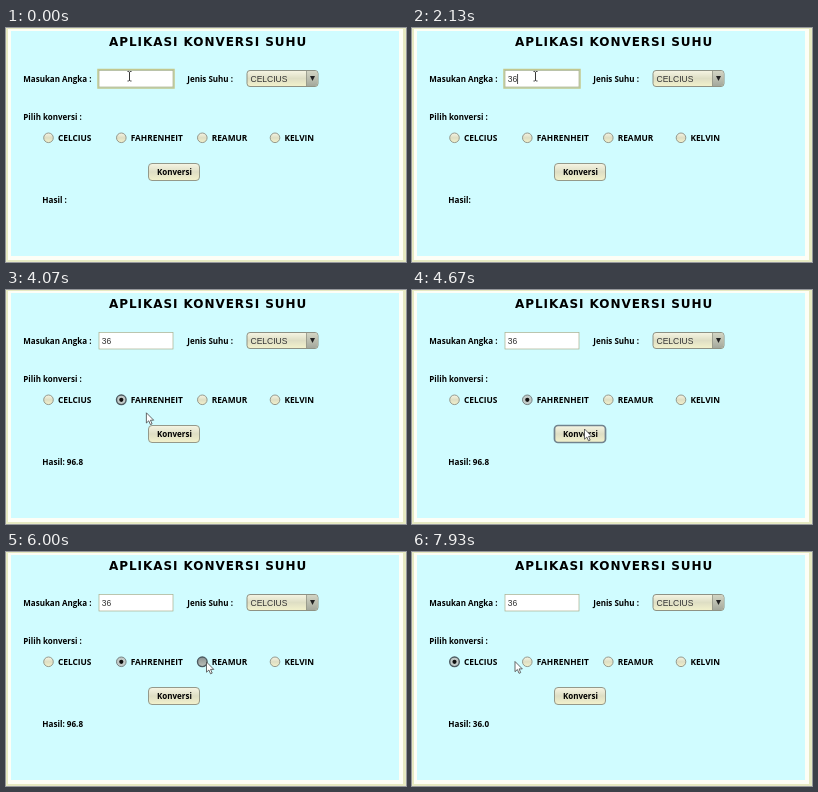
An HTML page for the animation above (8000 ms loop, 400 by 234 pixels).

```html
<!DOCTYPE html>
<html lang="id">
<head>
<meta charset="utf-8">
<title>Aplikasi Konversi Suhu</title>
<style>
  html, body { margin: 0; width: 100%; height: 100%; overflow: hidden; background: #e6e9c2; }
  svg { display: block; width: 100vw; height: 100vh; }
  text { fill: #000; }
  .label { font: bold 8px "Open Sans", "Noto Sans", sans-serif; }
  .option { font-size: 8.35px; }
  .result { font-size: 8.15px; }
  .field { font: 8.5px "Liberation Sans", Arial, sans-serif; fill: #333; }
  .title { font: bold 12px "DejaVu Sans", Verdana, sans-serif; letter-spacing: .95px; }
</style>
</head>
<body>
<svg viewBox="0 0 400 234">
  <defs>
    <linearGradient id="face" x2="0" y2="1">
      <stop offset="0" stop-color="#f6f5e4"/>
      <stop offset=".5" stop-color="#dedec4"/>
      <stop offset="1" stop-color="#f3f2cc"/>
    </linearGradient>
    <linearGradient id="arrowFace" x2="0" y2="1">
      <stop offset="0" stop-color="#d3d5c4"/>
      <stop offset="1" stop-color="#a4a89c"/>
    </linearGradient>
    <linearGradient id="dark" x2="0" y2="1">
      <stop offset="0" stop-color="#8a9191"/>
      <stop offset="1" stop-color="#bcc1ba"/>
    </linearGradient>
  </defs>

  <rect width="400" height="234" fill="#e6e9c2"/>
  <rect x="2" y="1" width="395" height="231" fill="#fdfef6"/>
  <rect x="5" y="3" width="388" height="225" fill="#d0fcff"/>

  <text class="title" x="103" y="17.5">APLIKASI KONVERSI SUHU</text>
  <text class="label" x="17.3" y="54">Masukan Angka :</text>
  <text class="label" x="181.3" y="54">Jenis Suhu :</text>
  <text class="label" x="17.3" y="92">Pilih konversi :</text>
  <text class="label result" id="result" x="36.3" y="175"></text>

  <rect id="inputFocus" x="92" y="41.5" width="76" height="18.5" fill="none" stroke="#c3c88e" stroke-width="1.5"/>
  <rect x="93" y="42.5" width="74" height="16.5" fill="#fff" stroke="#a9ae8c" stroke-width=".7"/>
  <text class="field" id="typed" x="95.7" y="54.3"></text>
  <path id="caret" d="M0 46V56" stroke="#222" stroke-width=".8"/>

  <rect x="241" y="42.5" width="71" height="16" rx="3" fill="url(#face)" stroke="#85877a" stroke-width=".9"/>
  <path d="M300.5 43h8.5q2.5 0 2.5 2.5v10q0 2.5-2.5 2.5h-8.5z" fill="url(#arrowFace)"/>
  <path d="M300.5 43v15" stroke="#85877a" stroke-width=".7"/>
  <path d="M304 48h5l-2.5 5z" fill="#222"/>
  <text class="field" x="244.5" y="54.3">CELCIUS</text>

  <rect id="button" x="142.5" y="135.5" width="51" height="17" rx="3.5" fill="url(#face)"/>
  <text class="label" x="151" y="147">Konversi</text>

  <g id="options"></g>

  <path id="beam" d="M-2-4.5h1.3l.7.7.7-.7H2M0-3.8V4.3M-2 5h1.3L0 4.3l.7.7H2" fill="none" stroke="#222" stroke-width=".9"/>
  <path id="arrow" d="M0 0v10.2l2.4-2.2 1.6 3.8 1.7-.7-1.6-3.7h3.2z" fill="#fff" stroke="#444" stroke-width=".8"/>
</svg>
<script>
const LOOP = 8000;
const el = id => document.getElementById(id);
const show = (node, on) => node.setAttribute("visibility", on ? "visible" : "hidden");

function outline(node, color, width) {
  node.setAttribute("stroke", color);
  node.setAttribute("stroke-width", width);
}

// Latest entry whose start time has passed.
const at = (steps, t) => steps.filter(([start]) => t >= start).pop()[1];

const typing = [[0, ""], [1150, "3"], [1500, "36"]];
const results = [[0, "Hasil :"], [1150, "Hasil:"], [3620, "Hasil: 96.8"], [6130, "Hasil: 28.8"], [7480, "Hasil: 36.0"]];
const selection = [[0, -1], [3620, 1], [6130, 2], [7480, 0]];
const pressed = [[0, -1], [3530, 1], [3620, -1], [5960, 2], [6130, -1], [7400, 0], [7480, -1]];
const focus = [[0, "input"], [3530, 1], [4600, "button"], [5960, 2], [7400, 0]];

// Pointer stops: time, x, y.
const stops = [
  [0, 123.5, 48], [2400, 123.5, 48],
  [3450, 115, 110], [3700, 115, 110],
  [4505, 172.5, 139], [5200, 172.5, 139],
  [5850, 200.5, 110], [6300, 200.5, 110],
  [7334, 42, 110], [7700, 42, 110],
  [7930, 103, 109.5], [LOOP, 103, 109.5]
];

function pointer(t) {
  const next = stops.findIndex(stop => stop[0] > t);
  const [t0, x0, y0] = stops[next - 1], [t1, x1, y1] = stops[next];
  const u = (t - t0) / (t1 - t0), k = u * u * (3 - 2 * u);
  return [x0 + (x1 - x0) * k, y0 + (y1 - y0) * k];
}

el("options").innerHTML = [["CELCIUS", 42.5], ["FAHRENHEIT", 115.3], ["REAMUR", 196.3], ["KELVIN", 269]]
  .map(([name, x]) => `<g><circle cx="${x}" cy="109.8" r="4.8"/><circle cx="${x}" cy="109.8" r="2.1" fill="#111"/>
    <text class="label option" x="${x + 9.4}" y="113">${name}</text></g>`).join("");
const options = [...el("options").children];

function draw(t) {
  const [x, y] = pointer(t);
  const text = at(typing, t), chosen = at(selection, t);
  const down = at(pressed, t), focused = at(focus, t);
  const editing = focused === "input";
  const overInput = x > 92 && x < 168 && y < 60;

  el("typed").textContent = text;
  el("result").textContent = at(results, t);
  show(el("inputFocus"), editing);
  el("caret").setAttribute("transform", `translate(${96.1 + text.length * 4.73})`);
  show(el("caret"), editing && Math.floor(t / 600) % 2);
  if (focused === "button") outline(el("button"), "#71838e", 1.7);
  else outline(el("button"), "#8c8f80", .9);

  options.forEach((option, i) => {
    const [ring, dot] = option.children;
    ring.setAttribute("fill", i === down ? "url(#dark)" : i === chosen ? "#c3cbc9" : "url(#face)");
    if (i === focused) outline(ring, "#4c5a60", 1.4);
    else outline(ring, i === chosen ? "#6c7879" : "#8c8f84", .9);
    show(dot, i === chosen);
  });

  for (const id of ["beam", "arrow"]) {
    el(id).setAttribute("transform", `translate(${x} ${y})`);
    show(el(id), (id === "beam") === overInput);
  }
}

const start = performance.now();
function frame() {
  draw((performance.now() - start) % LOOP);
  requestAnimationFrame(frame);
}
frame();
</script>
</body>
</html>
```
